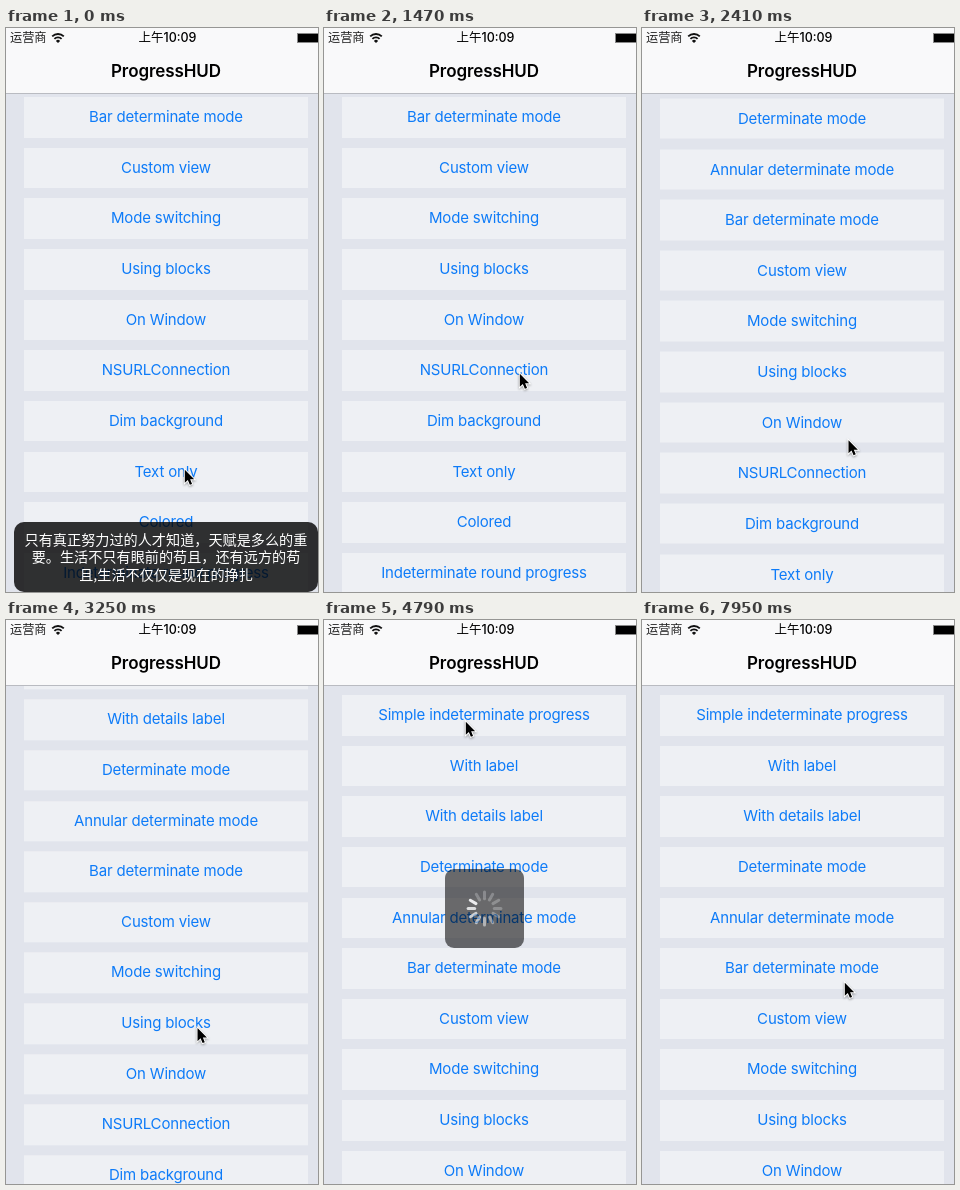
Recreate the animation shown at these times as an HTML page. Size 312 px wide and 564 px high, loop 8000 ms.

```html
<!DOCTYPE html>
<html lang="zh">
<head>
<meta charset="utf-8">
<title>ProgressHUD</title>
<style>
html, body { margin: 0; width: 100%; height: 100%; overflow: hidden; }
body { position: relative; background: #e1e4ec; font-family: Inter, "Noto Sans CJK SC", "Noto Sans CJK", sans-serif; }
#stage { position: absolute; left: 0; top: 0; width: 312px; height: 564px; overflow: hidden; }
#stage > *, header > *, .row { position: absolute; white-space: nowrap; }
#list { left: 18px; top: 75px; width: 284px; }
.row { left: 0; width: 284px; height: 40.5px; line-height: 40px; text-align: center;
  background: #eef0f4; color: #0d7bf8; font-size: 15px; letter-spacing: -.17px; }
header { left: 0; top: 0; width: 320px; height: 65px; background: #f9f9fa; border-bottom: 1px solid #b9bbc1; color: #000; }
#carrier { left: 4px; top: 1px; font-size: 12.2px; line-height: 17px; color: #222; }
#clock { left: 0; width: 323px; top: 1px; text-align: center; font-size: 12.5px; line-height: 17px; font-weight: 500; }
#title { left: 0; width: 320px; top: 32px; text-align: center; font-size: 17px; line-height: 22px; font-weight: 600; letter-spacing: -.08px; }
#wifi { left: 45px; top: 4px; }
#battery { left: 291px; top: 5px; width: 25px; height: 8px; border: 1px solid #888; background: #000; }
#toast { left: 8px; top: 494px; width: 304px; height: 70px; box-sizing: border-box; padding-top: 9px; border-radius: 10px;
  background: rgba(0,0,0,.8); color: #fff; text-align: center; font: 14.15px/17.3px "Noto Sans CJK SC", "Noto Sans CJK", sans-serif; }
#hud { left: 121px; top: 248.5px; width: 79px; height: 79px; border-radius: 9px; background: rgba(0,0,0,.8); }
#cursor { left: 0; top: 0; overflow: visible; filter: drop-shadow(0 1px 1px rgba(0,0,0,.35)); }
</style>
</head>
<body>
<div id="stage">
  <div id="list"></div>
  <header>
    <div id="carrier">运营商</div>
    <svg id="wifi" width="14" height="12" fill="none" stroke="#111" stroke-width="1.8">
      <path d="M1.2 4.4a8.2 8.2 0 0 1 11.6 0M3.4 6.9a5.1 5.1 0 0 1 7.2 0"/>
      <path d="M7 11L4.9 8.9a3 3 0 0 1 4.2 0z" fill="#111" stroke="none"/>
    </svg>
    <div id="clock">上午10:09</div>
    <div id="battery"></div>
    <div id="title">ProgressHUD</div>
  </header>
  <div id="toast">只有真正努力过的人才知道，天赋是多么的重<br>要。生活不只有眼前的苟且，还有远方的苟<br>且,生活不仅仅是现在的挣扎</div>
  <svg id="hud" viewBox="-39.5 -39.5 79 79" stroke="#fff" stroke-width="3" stroke-linecap="round"></svg>
  <svg id="cursor" width="14" height="20">
    <path d="M0 0V14.2L3.3 11.2 5.5 16.3 7.9 15.3 5.8 10.3H10.2Z" transform="translate(.8 .8) scale(.92)"
      stroke="#fff" stroke-width="2" paint-order="stroke"/>
  </svg>
</div>
<script>
const LOOP = 8000, PITCH = 50.63;
const $ = id => document.getElementById(id);
const labels = ['Simple indeterminate progress', 'With label', 'With details label', 'Determinate mode',
  'Annular determinate mode', 'Bar determinate mode', 'Custom view', 'Mode switching', 'Using blocks', 'On Window',
  'NSURLConnection', 'Dim background', 'Text only', 'Colored', 'Indeterminate round progress'];

$('list').innerHTML = labels.map((s, i) => `<div class="row" style="top:${i * PITCH}px">${s}</div>`).join('');
$('hud').innerHTML = Array.from({ length: 12 }, (_, i) =>
  `<path d="M0-9.8V-16.4" transform="rotate(${i * 30})"/>`).join('');
const spokes = [...$('hud').children];

const smooth = u => u * u * (3 - 2 * u);
const speedUp = u => u * u;
const progress = (t, start, end) => Math.min(1, Math.max(0, (t - start) / (end - start)));
const fade = (t, start) => smooth(progress(t, start, start + 300));

// Pointer moves: start, end, x, y, easing
const drag = [1500, 2220, 210, 434];
const flick = [2860, 3440, 188, 482, speedUp];
const moves = [[980, 1420, 195, 345], drag, [2240, 2760, 193, 345], flick, [3500, 4360, 141, 101],
  [4900, 5560, 216, 235], [6140, 6400, 216, 263], [6400, 6570, 196, 290], [6750, 7110, 195, 296],
  [7600, 7950, 202, 362]];

function pointer(t) {
  let x = 178, y = 441;
  for (const [start, end, toX, toY, ease = smooth] of moves) {
    const u = ease(progress(t, start, end));
    x += (toX - x) * u;
    y += (toY - y) * u;
  }
  return [x, y];
}

// The list follows the pointer once it has been pulled below GRIP.
const GRIP = 356, TOP = 259, GLIDE = 33;
const pulled = (t, [start, end]) => t < start ? 0 : Math.max(0, pointer(Math.min(t, end))[1] - GRIP);

function scrollOffset(t) {
  const since = t - flick[1];
  const glide = GLIDE * (1 - Math.exp(-Math.max(0, t - drag[1]) / 140));
  const offset = TOP - pulled(t, drag) - glide - pulled(t, flick);
  if (since < 0) return offset;
  // Released: a damped spring overshoots and settles at the first row.
  const damping = .008, speed = .47;
  return (offset + (damping * offset - speed) * since) * Math.exp(-damping * since);
}

function draw(t) {
  const [x, y] = pointer(t);
  $('list').style.transform = `translateY(${-scrollOffset(t)}px)`;
  $('cursor').style.transform = `translate(${x}px,${y}px)`;
  $('toast').style.opacity = 1 - fade(t, 270);
  $('hud').style.opacity = fade(t, 4600) - fade(t, 5550);
  const lead = 10 + Math.floor((t - 4750) * 12 / 1000);
  spokes.forEach((s, i) => {
    const age = ((lead - i) % 12 + 12) % 12;
    s.style.opacity = Math.max(.26, .9 - age * .1);
  });
}

const begin = performance.now();
function tick() {
  draw((performance.now() - begin) % LOOP);
  requestAnimationFrame(tick);
}
tick();
</script>
</body>
</html>
```
